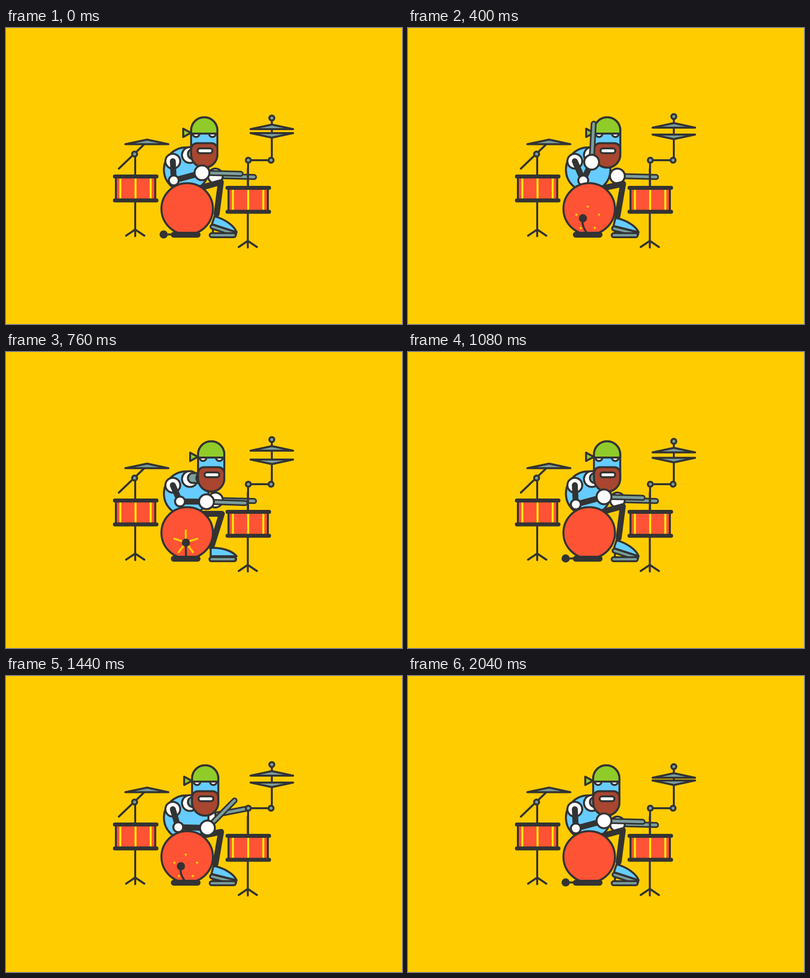
Write an HTML page that moves like this. It is 800 px wide and 600 px high and loops after 2.08 s.

```html
<!DOCTYPE html>
<html lang="en">
<head>
<meta charset="utf-8">
<title>Drummer</title>
<style>
  html, body { margin: 0; width: 100%; height: 100%; overflow: hidden; background: #ffcc00; }
  svg { display: block; width: 100vw; height: 100vh; }
  .o { stroke: #333; stroke-width: 4; stroke-linejoin: round; stroke-linecap: round; }
  .n { fill: none; }
  .limb { fill: none; stroke: #333; stroke-width: 12; stroke-linejoin: round; stroke-linecap: round; }
  .bar { stroke: #333; stroke-width: 8; stroke-linecap: round; }
  .stripe { stroke: #ffee00; stroke-width: 4; }
  .core { stroke: #7b9e9c; stroke-linecap: round; }
  .grey { fill: #7b9e9c; }
  .red { fill: #ff5335; }
  .blue { fill: #66ccff; }
  .green { fill: #8fcc29; }
  .beard { fill: #a84630; }
  .white { fill: #fff; }
  .dark { fill: #333; }
</style>
</head>
<body>
<svg viewBox="0 0 800 600">
  <defs>
    <g id="drum">
      <path class="o n" d="M45 -3V-39M45 50V121M26.500 120L45 107.500L63.500 120"/>
      <rect class="o red" x="6" y="2" width="79.500" height="45"/>
      <path class="stripe" d="M15 4V45M45.700 4V45M76.300 4V45"/>
      <path class="bar" d="M4 0H88M4 48.500H88"/>
    </g>
    <g id="stick">
      <path class="limb" d="M0 0H78"/>
      <path class="core" stroke-width="5.500" d="M0 0H78"/>
    </g>
  </defs>

  <use href="#drum" x="216" y="301"/>
  <path class="o n" d="M278 237L228 285"/>
  <path class="o grey" d="M241 235.500L285 226.300L328 235.500Z"/>
  <circle class="o grey" cx="259.800" cy="255.500" r="5"/>

  <g id="farHand">
    <use href="#stick"/>
    <circle class="o white" r="15"/>
  </g>

  <path class="o n" d="M489 321V268H537V190"/>
  <use href="#drum" x="443.500" y="324"/>
  <circle class="o grey" cx="489.500" cy="268" r="5"/>
  <circle class="o grey" cx="535.500" cy="268" r="5"/>
  <g id="topHat">
    <path class="o n" d="M537 -18V-9"/>
    <circle class="o grey" cx="537" cy="-22.500" r="5"/>
    <path class="o grey" d="M494 0L537 -9.200L580 0Z"/>
  </g>
  <path id="lowHat" class="o grey" d="M494 0L537 9.200L580 0Z"/>

  <circle class="o blue" cx="364" cy="287" r="45"/>
  <circle class="o white" cx="371.500" cy="257.500" r="16"/>
  <path id="neck" class="o grey"/>
  <circle id="collar" class="o grey" cx="395" cy="255.500" r="10.500"/>

  <g id="head">
    <path class="o green" d="M-42.500 204V221L-27 212.500Z"/>
    <rect class="o blue" x="-26.500" y="181" width="53" height="102" rx="26.500"/>
    <path class="o white" d="M-23.500 214a7 7 0 0 0 14 0ZM9.500 214a7 7 0 0 0 14 0Z"/>
    <path class="o green" d="M-26.500 214V207.500a26.500 26.500 0 0 1 53 0V214Z"/>
    <path class="o beard" d="M-26.500 245.500a12 12 0 0 1 12 -12h29a12 12 0 0 1 12 12V256.500a26.500 26.500 0 0 1 -53 0Z"/>
    <rect class="o white" x="-13.500" y="244" width="30" height="9.700" rx="4.850"/>
  </g>

  <path id="leg" class="limb"/>
  <path class="o n" d="M418 409V418"/>
  <g id="plate">
    <path class="limb" d="M-46 0H0"/>
    <path class="core" stroke-width="4.500" d="M-46 0H0"/>
  </g>
  <path class="limb" d="M415.500 420H460"/>
  <path class="core" stroke-width="4.500" d="M415.500 420H460"/>
  <path id="shoe" class="o blue" d="M413.500 397C436 396 457 403 466 414H413.500Z"/>

  <circle class="o white" cx="337" cy="270" r="15"/>
  <path id="upperArm" class="limb"/>
  <path id="foreArm" class="limb"/>
  <circle id="elbow" class="o white" r="10"/>
  <g id="nearHand">
    <use href="#stick"/>
    <circle class="o white" r="15"/>
  </g>

  <circle class="o red" cx="366" cy="366.500" r="52"/>
  <path id="burst" class="n" stroke="#ffcc00" stroke-width="4"/>
  <path id="rod" class="o n"/>
  <path class="limb" d="M339 419H387"/>
  <circle id="beater" class="dark" r="8.300"/>
</svg>
<script>
const LOOP = 2080, BEAT = 520, STEP = 40;
const el = {};
document.querySelectorAll('[id]').forEach(node => el[node.id] = node);
const set = (id, name, value) => el[id].setAttribute(name, value);
const lerp = (a, b, p) => a + (b - a) * p;
const smooth = p => p * p * (3 - 2 * p);

// keys: [time, ...values]; returns the values at time t
function tween(keys, t, ease = smooth) {
  let i = 0;
  while (i < keys.length - 2 && t >= keys[i + 1][0]) i++;
  const a = keys[i], b = keys[i + 1];
  const p = ease(Math.min(1, Math.max(0, (t - a[0]) / (b[0] - a[0]))));
  return a.slice(1).map((v, k) => lerp(v, b[k + 1], p));
}
const linear = p => p;

// Tracks repeated on every beat
const headX = [[0, 400.5], [40, 402.2], [180, 419], [200, 418.5], [240, 414.5], [400, 402.4], [480, 400.6], [520, 400.5]];
const hatY = [[0, 205], [40, 203.5], [120, 201.2], [200, 200], [240, 200], [320, 200.4], [400, 202], [480, 206.2], [520, 205]];
const lift = [[0, 1], [40, 1], [200, 0], [240, 0], [400, 0.78], [480, 1], [520, 1]];
const fall = [[0, 1], [60, 1], [180, 0], [340, 0], [400, 0.19], [480, 1], [520, 1]];
const rays = [[0, 0, 0], [160, 0, 0], [240, 0, 26], [400, 22, 26], [440, 26, 26], [520, 26, 26]];

// Arm poses: elbow x, y, hand x, y, stick angle
const rest = [339, 309, 396, 293.5, 1.5];
const high = [354, 309, 371, 272, -87];
const back = [351.5, 303, 405, 303.5, 2];
const flick = [348, 306.5, 407, 308, -45.5];
const hit = [349, 306, 411, 312, 3.5];
const nearArm = [[0, ...rest], [120, ...rest], [400, ...high], [700, ...hit], [760, ...back], [840, ...rest],
  [1160, ...rest], [1440, ...flick], [1720, ...hit], [1760, ...hit], [1880, ...rest], [LOOP, ...rest]];
const farArm = [[0, 423, 300, 1.5], [1200, 423, 300, 1.5], [1440, 408.5, 284, -11], [1680, 423, 300, 1.5], [LOOP, 423, 300, 1.5]];

const place = (id, x, y, angle = 0) => set(id, 'transform', `translate(${x} ${y}) rotate(${angle})`);

function drawKick(beat) {
  const [p] = tween(fall, beat);
  const angle = Math.PI * (0.5 + p / 2), r = lerp(32, 45, p);
  const x = 363.5 + r * Math.cos(angle), y = 418.5 - r * Math.sin(angle);
  const bend = 16 * Math.sin(Math.PI * p);
  const cx = (x + 363.5) / 2 + bend * Math.cos(angle + 1.2);
  const cy = (y + 418.5) / 2 - bend * Math.sin(angle + 1.2);
  set('rod', 'd', `M363.500 418Q${cx} ${cy} ${x} ${y}`);
  place('beater', x, y);

  const [inner, outer] = tween(rays, beat, linear);
  let d = '';
  for (let i = 0; i < 5 && inner < outer; i++) {
    const a = Math.PI * (0.4 * i - 0.5), c = Math.cos(a), s = Math.sin(a);
    d += `M${363.2 + inner * c} ${386 + inner * s}L${363.2 + outer * c} ${386 + outer * s}`;
  }
  set('burst', 'd', d);
}

function drawLeg(beat) {
  const [k] = tween(lift, beat);
  set('leg', 'd', `M382 ${lerp(328, 327, k)}L${lerp(436, 434, k)} ${lerp(328, 312.5, k)}L${lerp(415, 425.5, k)} ${lerp(395, 377, k)}`);
  set('shoe', 'transform', `rotate(${18 * k} 466 414)`);
  place('plate', 461, 420 - 3 * k, 18 * k);
}

function draw(t) {
  const beat = t % BEAT;
  const [x] = tween(headX, beat, linear);
  place('head', x, 0);
  set('neck', 'd', `M${x} 245.500H377.500a10 10 0 0 0 0 20H${x}Z`);

  const [hat] = tween(hatY, beat, linear);
  place('topHat', 0, hat);
  place('lowHat', 0, 418 - hat);

  drawLeg(beat);
  drawKick(beat);

  const [ex, ey, hx, hy, angle] = tween(nearArm, t);
  set('upperArm', 'd', `M337 270L${ex} ${ey}`);
  set('foreArm', 'd', `M${ex} ${ey}L${hx} ${hy}`);
  place('elbow', ex, ey);
  place('nearHand', hx, hy, angle);
  place('farHand', ...tween(farArm, t));
}

const start = performance.now();
function frame() {
  const t = (performance.now() - start) % LOOP;
  draw(Math.floor(t / STEP) * STEP);
  requestAnimationFrame(frame);
}
frame();
</script>
</body>
</html>
```
